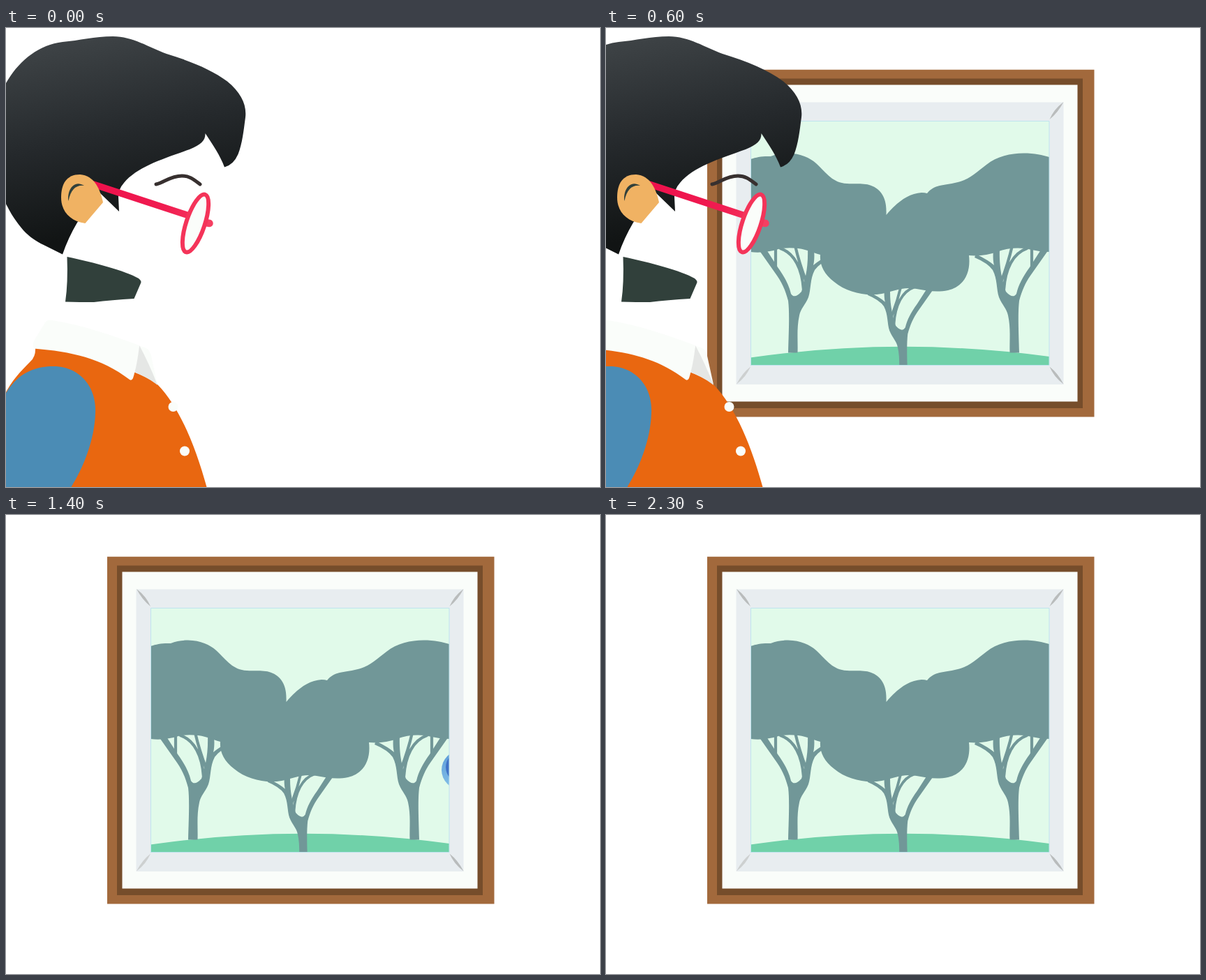
An HTML page that plays this animation: 851 by 658 pixels, repeating every 2.4 s.

```html
<!DOCTYPE html>
<html lang="en">
<head>
<meta charset="utf-8">
<title>Gallery visitor</title>
<style>
html, body { margin: 0; width: 100%; height: 100%; overflow: hidden; background: #fff; }
svg { display: block; width: 100vw; height: 100vh; }
.line { fill: none; stroke-linecap: round; }
</style>
</head>
<body>
<svg viewBox="0 0 851 658">
  <defs>
    <linearGradient id="hair" gradientUnits="userSpaceOnUse" x1="385" y1="15" x2="440" y2="285">
      <stop offset="0" stop-color="#3d4245"/>
      <stop offset=".5" stop-color="#25292c"/>
      <stop offset="1" stop-color="#111414"/>
    </linearGradient>
    <linearGradient id="rim" gradientUnits="userSpaceOnUse" x1="380" y1="224" x2="548" y2="280">
      <stop offset="0" stop-color="#ee104c"/>
      <stop offset=".6" stop-color="#f01c50"/>
      <stop offset="1" stop-color="#f73e62"/>
    </linearGradient>
    <linearGradient id="glow" x1="0" y1="0" x2="0" y2="1">
      <stop offset="0" stop-color="#5a9bd8"/>
      <stop offset="1" stop-color="#84c0e8"/>
    </linearGradient>
    <clipPath id="pane"><path d="M207.5 133.5H635V483.5H207.5z"/></clipPath>
    <g id="tree">
      <path d="M261 465.500C262 430 263 408 261 391C257 376 252 365 245 355L219 318H230L246 343C256 357 262 368 265 381Q270 389 280 378C285 362 290 345 289 316H298C299 330 298 336 297 340Q305 333 323 324L325 329Q306 337 299 347C292 360 294 374 290 386C285 398 279 402 277 412C273 430 275 448 274.500 465.500z"/>
      <path class="line" stroke="#719798" stroke-width="4.200" d="M283 375C281 345 270 323 250 316M287 364Q277 338 271 312"/>
    </g>
    <g id="sideTree">
      <use href="#tree"/>
      <path class="line" stroke="#719798" stroke-width="4.200" d="M243 344V312"/>
    </g>
    <path id="leaf" d="M187 106Q201 116.500 207 131Q195 121.500 187 106z"/>
  </defs>

  <g id="painting">
    <path fill="#a2693c" d="M145 59.7H699.5V557.5H145z"/>
    <path fill="#764d2b" d="M159 72.5H683V545H159z"/>
    <path fill="#fafdfa" d="M166.500 81.500H675.500V535.500H166.500z"/>
    <path fill="#e8edf0" d="M186.5 106.5H655.5V511H186.5z"/>
    <g fill="#b9bcbc">
      <use href="#leaf"/>
      <use href="#leaf" transform="matrix(-1 0 0 1 842.5 0)"/>
      <use href="#leaf" transform="matrix(1 0 0 -1 0 616.5)" fill="#cdd0d0"/>
      <use href="#leaf" transform="matrix(-1 0 0 -1 842.5 616.5)"/>
    </g>
    <g clip-path="url(#pane)">
      <path fill="#e1faea" d="M207 133H635V484H207z"/>
      <path fill="#70d1a9" d="M207 472.5Q421 442 635 471V484H207z"/>
      <g id="ball">
        <circle r="28" fill="url(#glow)"/>
        <circle cy="-4" r="22" fill="#3f72c6"/>
        <circle cx="-15" cy="14" r="1.5" fill="#d9effa"/>
      </g>
      <g fill="#719798">
        <use href="#sideTree"/>
        <use href="#sideTree" transform="matrix(-1 0 0 1 853 0)"/>
        <use href="#tree" transform="matrix(-.9 0 0 .9 667.2 86.7)"/>
        <path d="M207 188C216 185 224 183.500 236 184C244 180.500 253 179.500 261 179.500C279 180 292 186 301 194C317 209 325 222 345 223C365 224 376 221 389 231C400 240 402 253 401.500 268C415 252 432 237 452 236Q457 236 460 237C470 224 484 226 502 221.500C520 218 530 207 545 196C560 184 580 179.500 598 179.500C615 179.500 625 182 635 185V321Q622 321 610 318Q585 312 560 321Q541 328 520 326C523 352 512 371 490 376C475 379 460 377 445 374C425 370 410 378 395 381C372 385 345 379 327 364C312 352 306 340 307 325C295 322 285 316 270 315.500Q254 314 240 319Q222 323 207 321z"/>
      </g>
    </g>
    <path fill="none" stroke="#bfe4ee" d="M207.500 133.500H635V483.500H207.500z"/>
  </g>

  <g id="boy">
    <path fill="url(#hair)" d="M407 12C436 12 459 28 484 37C520 48 549 60 571 76.500C591 93 599 110 597 128C594.500 147 592.500 166 586.500 181Q580 196 567 199.500C561 183 550 167 539.500 151C540 161 534 167 517 174C478 188 442 199 423 222Q415 231 415 242L416 263L387 235L356 279Q343 301 335 324.500L308 311C285 300 275 287 262 267C244 236 234 205 234 168C234 133 242 97 257 74C275 45 302 24 335 20C359 18 381 12 407 12z"/>
    <path class="line" stroke="url(#rim)" stroke-width="9.500" stroke-linecap="butt" d="M379 224L516 269"/>
    <path fill="#f0b263" d="M367.500 280L393 250C389 231 380 211 360 210C341 210 333 223 333 243C333 263 346 277 367.500 280z"/>
    <path fill="#31403b" d="M343.500 248C341 235 350 216 366 226Q348 224 343.500 248z"/>
    <path class="line" stroke="#37302f" stroke-width="5" d="M469 224C480 222 489 212 506 212C518 212 524 218 532 224"/>
    <path class="line" stroke="#f53f62" stroke-width="10.500" d="M540 279L545.500 280"/>
    <ellipse rx="13.200" ry="43.500" transform="translate(525.500 280) rotate(18.500)" fill="#fafdfa" stroke="#f43459" stroke-width="6"/>
    <path fill="#31403b" d="M341.500 328C380 336 425 348 444 359Q449 363 447 366L437.500 388Q405 390 380 393Q360 393 339 392.500Q343 365 341.500 328z"/>
    <path fill="#e96710" d="M296 457Q297 471 289 478C270 497 260 509 250 530L300 658H541.500C526 602 504 545 471 511Q456 500 434 492L390 468z"/>
    <path fill="#4b8cb5" d="M211.500 658C219 611 234 553 253 525C270 495 295 485 322 485C360 485 384 515 382 552C381 590 365 630 347.500 658z"/>
    <path fill="#fafdfa" d="M445 456Q458 457 461.500 468L471 511L443 480z"/>
    <path fill="#e5e7e5" d="M445 455L437 493Q458 501 471 512Q460 483 445 455z"/>
    <path fill="#fafdfa" d="M320 419C365 426 407 441 445 455C443 474 440 489 436 502Q434 506 431 504C390 473 348 464 294 459.500Q291 453 295 447L309 424Q312 418 320 419z"/>
    <g fill="#fafdfa">
      <circle cx="493.500" cy="543" r="7"/>
      <circle cx="510" cy="606.500" r="7"/>
    </g>
  </g>
</svg>
<script>
const [painting, ball, boy] = ['painting', 'ball', 'boy'].map(id => document.getElementById(id));
const LOOP = 2400, STEP = 100;
const show = (el, on) => el.style.display = on ? '' : 'none';
const place = (el, x, y) => el.setAttribute('transform', `translate(${x.toFixed(2)} ${y})`);

function boyX(t) {
  if (t < 300) return 1.27 * (t - 200);
  const n = (t - 800) / 100;
  return 26 + 177 * n + 2.75 * n * n;
}

function draw(now) {
  const t = Math.floor(now % LOOP / STEP) * STEP;
  show(painting, t >= 300);
  show(boy, t < 300 || t >= 500 && t < 1100);
  show(ball, t >= 1400 && t < 2300);
  place(boy, boyX(t), 0);
  // Half a cosine wave carries the ball across the pane
  place(ball, 421 + 245 * Math.cos(Math.PI * (t - 1292) / 1000), 365.5);
}

let start;
function tick(now) {
  start ??= now;
  draw(now - start);
  requestAnimationFrame(tick);
}
draw(0);
requestAnimationFrame(tick);
</script>
</body>
</html>
```
